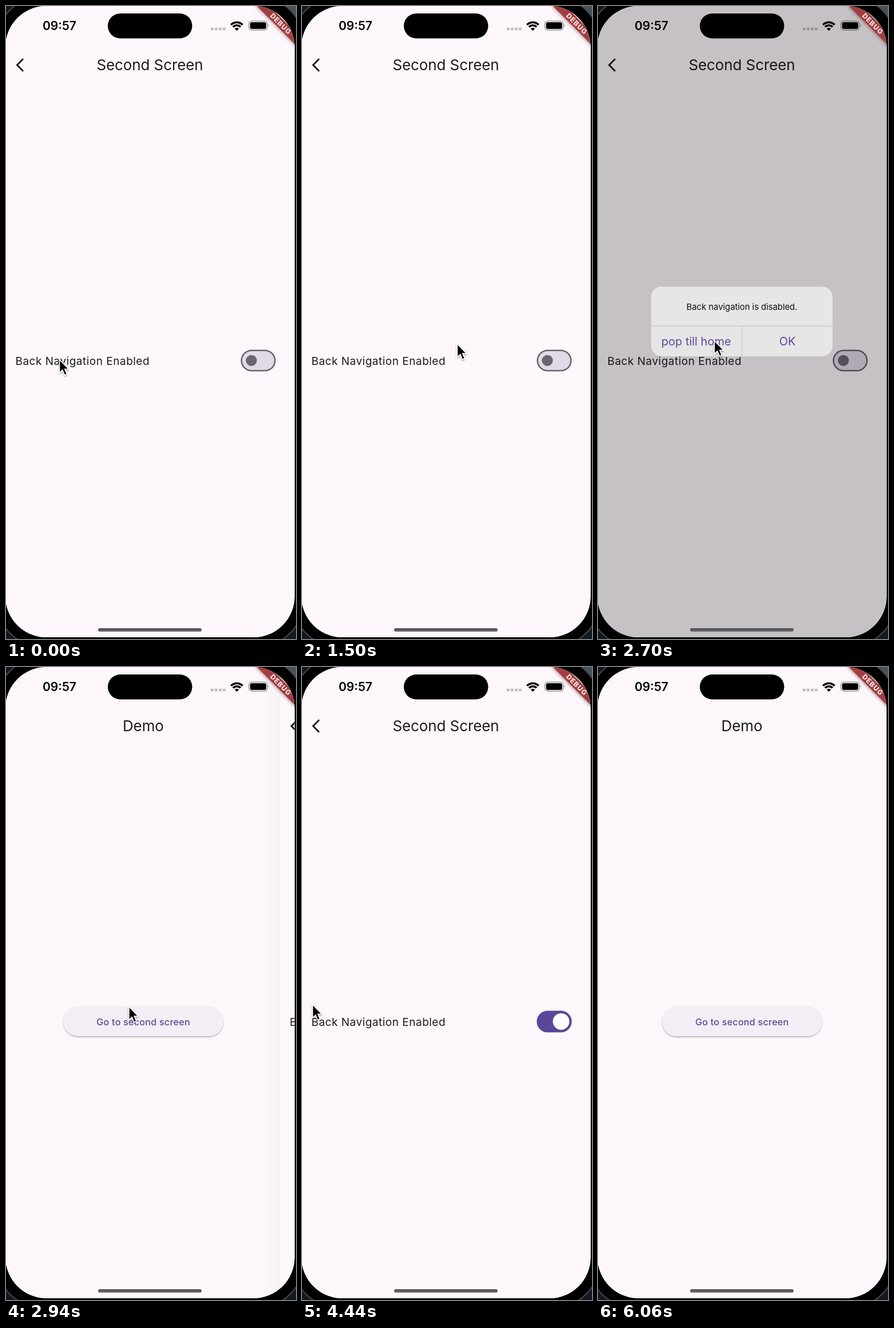
Recreate the animation shown at these times as an HTML page. Size 507 by 1104 pixels, loop 6.12 s.

```html
<!DOCTYPE html>
<html lang="en">
<head>
<meta charset="utf-8">
<title>Back navigation demo</title>
<style>
html, body { margin: 0; width: 100%; height: 100%; overflow: hidden; background: #000; }
svg { display: block; width: 100vw; height: 100vh; }
text { font-family: Inter, "Noto Sans", sans-serif; fill: #1d1b20; }
.mid { text-anchor: middle; }
.title { font-size: 26px; letter-spacing: -.1px; }
.row { font-size: 19px; letter-spacing: .5px; }
.go { font-size: 16.2px; font-weight: 500; letter-spacing: .2px; fill: #5c4a96; }
.message { font-size: 15px; letter-spacing: -.1px; fill: #111; }
.action { font-size: 20px; fill: #5f479f; }
.clock { font-size: 21px; font-weight: 600; fill: #000; }
.debug { font-size: 12px; font-weight: 800; letter-spacing: 1px; fill: #f6e6e6; }
</style>
</head>
<body>
<svg viewBox="0 0 507 1104" preserveAspectRatio="none">
  <defs>
    <clipPath id="screen"><rect x="-1" y="0" width="505.5" height="1101" rx="71.5"/></clipPath>
    <linearGradient id="edge">
      <stop offset="0" stop-color="#000" stop-opacity="0"/>
      <stop offset="1" stop-color="#000" stop-opacity=".02"/>
    </linearGradient>
    <linearGradient id="homeBar" x2="0" y2="1">
      <stop offset="0" stop-color="#444246"/>
      <stop offset="1" stop-color="#77747a"/>
    </linearGradient>
    <filter id="soft" x="-20%" y="-30%" width="140%" height="170%">
      <feDropShadow dx="0" dy="1.6" stdDeviation="1.2" flood-opacity=".32"/>
    </filter>
    <filter id="bannerShadow" x="-20%" y="-60%" width="140%" height="220%">
      <feDropShadow dx="0" dy="0" stdDeviation="3.5" flood-opacity=".5"/>
    </filter>
    <filter id="cursorShadow" x="-40%" y="-30%" width="180%" height="180%">
      <feDropShadow dx="0" dy="1.5" stdDeviation="1.4" flood-opacity=".4"/>
    </filter>
  </defs>

  <rect width="507" height="1104" fill="#111820"/>
  <rect x="440" width="67" height="60" fill="#46535d"/>
  <rect x="-20" y="-19" width="543.5" height="1139" rx="90.5" fill="#000" stroke="#49494c" stroke-width="2"/>

  <g clip-path="url(#screen)">
    <rect x="-2" width="508" height="1104" fill="#fdf7fb"/>
    <g id="home">
      <text class="title mid" x="251.5" y="112">Demo</text>
      <rect id="button" x="112" y="592" width="279.5" height="52" rx="26" filter="url(#soft)"/>
      <text class="go mid" x="251.7" y="624.5">Go to second screen</text>
    </g>
    <g id="second">
      <rect x="-25" width="25" height="1104" fill="url(#edge)"/>
      <rect width="508" height="1104" fill="#fdf7fb"/>
      <path d="M30 92.3 19.5 103 30 113.7" fill="none" stroke="#1d1b20" stroke-width="3"/>
      <text class="title mid" x="251.5" y="112">Second Screen</text>
      <text class="row" x="16.5" y="625.5">Back Navigation Enabled</text>
      <rect id="track" x="411.7" y="600.7" width="58.6" height="35.3" rx="17.65" stroke-width="2.6"/>
      <circle id="thumb" cy="618.3"/>
    </g>
    <rect id="barrier" x="-2" width="508" height="1104"/>
    <g id="dialog">
      <rect x="93" y="489.5" width="317" height="121.5" rx="18" fill="#e6e6e6"/>
      <path d="M93 558H410M251.5 558V611" stroke="#bdbdbf"/>
      <text class="message mid" x="251.5" y="529.5">Back navigation is disabled.</text>
      <text class="action mid" x="171.7" y="592">pop till home</text>
      <text class="action mid" x="331" y="592">OK</text>
    </g>
    <g transform="translate(511 0) rotate(45)">
      <rect x="-52" y="36" width="104" height="15.4" fill="#a33c3f" filter="url(#bannerShadow)"/>
      <text class="debug mid" x=".5" y="48">DEBUG</text>
    </g>

    <text class="clock mid" x="93.5" y="42">09:57</text>
    <rect x="178" y="13" width="147.5" height="43.5" rx="21.75"/>
    <path d="M358 40h26" stroke="#000" stroke-opacity=".23" stroke-width="4.6" stroke-dasharray="5 2"/>
    <g fill="none" stroke="#000" stroke-width="3.6">
      <path d="M393.3 32.8a14.4 14.4 0 0 1 20.4 0"/>
      <path d="M397 36.5a9.2 9.2 0 0 1 13 0"/>
    </g>
    <path d="M403.5 43.2l-3.7-3.7a5.2 5.2 0 0 1 7.4 0z"/>
    <rect x="424.6" y="26.2" width="32.4" height="15.8" rx="5" fill="none" stroke="#000" stroke-opacity=".42" stroke-width="1.3"/>
    <rect x="426.7" y="28.2" width="28.2" height="11.8" rx="3.2"/>
    <path d="M458.6 31.6q2.2 2.5 0 5z" fill-opacity=".45"/>
    <rect x="161" y="1085.3" width="181" height="6" rx="3" fill="url(#homeBar)"/>
  </g>

  <path id="cursor" d="M.5 .8V23.8L5.7 18.9 9.5 27.8 13.5 26.1 9.7 17.3H16.7Z" fill="#000" stroke="#fff" stroke-width="1.5" filter="url(#cursorShadow)"/>
</svg>

<script>
const LOOP = 6120, WIDTH = 504, SLOP = 58;
const FADE = 125, SETTLE = 135, SLIDE = 250, FLIP = 100;

const el = id => document.getElementById(id);
const [home, second, button, track, thumb, barrier, dialog, cursor] =
  ["home", "second", "button", "track", "thumb", "barrier", "dialog", "cursor"].map(el);

const lerp = (a, b, k) => a + (b - a) * k;
const progress = (t, start, length) => Math.min(1, Math.max(0, (t - start) / length));
const smooth = k => k * k * (3 - 2 * k);
const mix = (a, b, k) => `rgb(${a.map((v, i) => lerp(v, b[i], k))})`;

function bezier(x1, y1, x2, y2) {
  const at = (a, b, s) => 3 * (1 - s) ** 2 * s * a + 3 * (1 - s) * s * s * b + s ** 3;
  return x => {
    if (x <= 0 || x >= 1) return x <= 0 ? 0 : 1;
    let lo = 0, hi = 1;
    for (let i = 0; i < 24; i++) {
      const s = (lo + hi) / 2;
      if (at(x1, x2, s) < x) lo = s; else hi = s;
    }
    return at(y1, y2, lo);
  };
}

const ease = bezier(.25, .1, .25, 1);
const easeInOut = bezier(.42, 0, .58, 1);
const linearToEaseOut = bezier(.35, .91, .33, .97);
const settle = bezier(.18, 1, .04, 1);
const slideStart = bezier(.283, .044, .545, .57);
const slideEnd = bezier(.209, 1, .435, .976);
const slide = k => k < .198 ? .541 * slideStart(k / .198) : .541 + .459 * slideEnd((k - .198) / .802);

// time, x, y
const pointer = [
  [0, 93, 616], [220, 18, 610], [290, 18, 610], [570, 247, 608], [720, 247, 608],
  [1060, 331, 584], [1400, 331, 584], [1760, 18, 608], [1840, 18, 608], [2120, 248, 608],
  [2220, 248, 608], [2690, 203, 583], [2820, 203, 583], [3300, 275, 638], [3490, 275, 638],
  [3960, 440, 618], [4090, 440, 618], [4430, 18, 588], [4720, 18, 590], [5240, 525, 590],
  [LOOP, 525, 590]
];

function pointerAt(t) {
  const i = pointer.findIndex(p => p[0] > t);
  const [t0, x0, y0] = pointer[i - 1], [t1, x1, y1] = pointer[i];
  const k = smooth((t - t0) / (t1 - t0));
  return [lerp(x0, x1, k), lerp(y0, y1, k)];
}

// grab and release times, resting position
const swipes = [[290, 599, 0], [1840, 2150.6, 0], [4720, 5130, WIDTH]];
// opening and closing times
const popups = [[599, 1180], [2150.6, 2810]];
const POP = 2810, PUSH = 3397, TOGGLE = 4060;

function pagesAt(t) {
  if (t >= PUSH && t < swipes[2][0]) {
    const k = progress(t, PUSH, SLIDE);
    return [WIDTH * (1 - slide(k)), -WIDTH / 3 * linearToEaseOut(k)];
  }
  if (t >= POP && t < PUSH) {
    const k = progress(t, POP, SLIDE);
    return [WIDTH * slide(k), -WIDTH / 3 * (1 - linearToEaseOut(k))];
  }
  let x = 0;
  for (const [grab, release, rest] of swipes) {
    if (t < grab) break;
    const held = Math.min(t, release);
    x = Math.max(0, pointerAt(held)[0] - pointerAt(grab)[0] - SLOP);
    if (t > release) x = lerp(x, rest, settle(progress(t, release, SETTLE)));
  }
  return [x, -(WIDTH - x) / 3];
}

function drawDialog(t) {
  let opacity = 0, dim = 0, scale = 1;
  for (const [open, close] of popups) {
    if (t < open || t > close + FADE) continue;
    const k = progress(t, open, FADE), out = 1 - progress(t, close, FADE);
    opacity = easeInOut(k) * easeInOut(out);
    dim = .22 * ease(k) * ease(out);
    scale = 1.3 - .3 * linearToEaseOut(k);
  }
  barrier.setAttribute("opacity", dim);
  dialog.setAttribute("opacity", opacity);
  dialog.setAttribute("transform", `translate(251.5 550) scale(${scale}) translate(-251.5 -550)`);
}

function drawToggle(t) {
  const k = smooth(progress(t, TOGGLE, FLIP));
  const violet = [91, 70, 153], grey = [107, 101, 112];
  track.setAttribute("fill", mix([224, 217, 230], violet, k));
  track.setAttribute("stroke", mix(grey, violet, k));
  thumb.setAttribute("fill", mix(grey, [255, 255, 255], k));
  thumb.setAttribute("cx", lerp(429, 453, k));
  thumb.setAttribute("r", lerp(9.6, 14.4, k));
}

function draw(t) {
  const [front, back] = pagesAt(t);
  second.setAttribute("transform", `translate(${front})`);
  home.setAttribute("transform", `translate(${back})`);
  second.setAttribute("visibility", front >= WIDTH - .3 ? "hidden" : "visible");
  const pressed = progress(t, 3340, 60) * (1 - progress(t, 3500, 100));
  button.setAttribute("fill", mix([243, 238, 246], [223, 215, 236], pressed));
  drawToggle(t);
  drawDialog(t);
  cursor.setAttribute("transform", `translate(${pointerAt(t)})`);
}

const begin = performance.now();
function tick() {
  draw((performance.now() - begin) % LOOP);
  requestAnimationFrame(tick);
}
draw(0);
requestAnimationFrame(tick);
</script>
</body>
</html>
```
